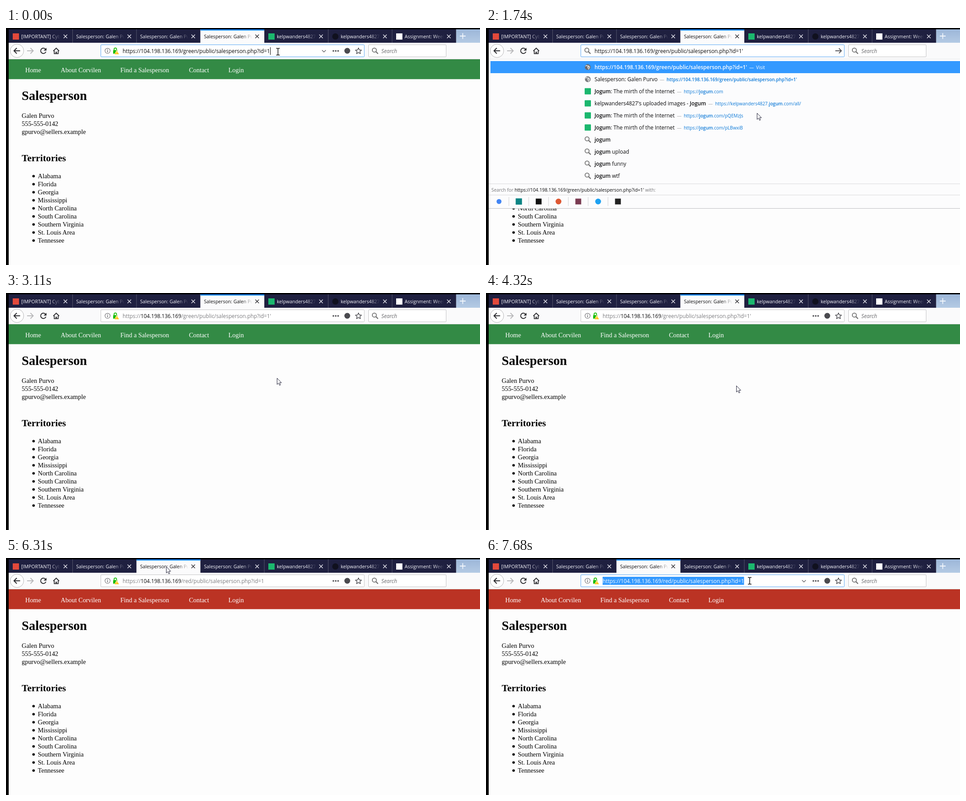
Write an HTML page that moves like this. It is 1057 px wide and 530 px high and loops after 7990 ms.

```html
<!DOCTYPE html>
<html lang="en">
<head>
<meta charset="utf-8">
<title>Browser session</title>
<style>
  html, body { margin: 0; width: 100%; height: 100%; overflow: hidden; background: #000; }
  svg { display: block; width: 100%; height: 100%; }
  text { white-space: pre; }
  .ui { font-family: "Open Sans", "Noto Sans", sans-serif; }
  .page { font-family: "Liberation Serif", "Times New Roman", serif; font-size: 14.4px; }
</style>
</head>
<body>
<svg id="stage" viewBox="0 0 1057 530"></svg>
<script>
const LOOP = 7990, TAB_W = 142.5, TAB_X = 6;
const INK = '#0c0c0d', ICON = '#4a4a4f', BLUE = '#3399ff', LINK = '#0a78d7';
const PERSON = 'Galen Purvo', USER = 'kelpwanders4827', SITE = 'Jogum';
const HOST = '104.198.136.169', PATH = '/public/salesperson.php?id=1';
const STATES = ['Alabama', 'Florida', 'Georgia', 'Mississippi', 'North Carolina',
  'South Carolina', 'Southern Virginia', 'St. Louis Area', 'Tennessee'];
const TABS = [
  { title: '[IMPORTANT] Cybersec', icon: '#e2493b' },
  { title: `Salesperson: ${PERSON}` },
  { title: `Salesperson: ${PERSON}` },
  { title: `Salesperson: ${PERSON}` },
  { title: `${USER}'s upl`, icon: '#1bb76e' },
  { title: `${USER}/we`, icon: '#10111f', round: true },
  { title: 'Assignment: Week 8', icon: '#ffffff' }
];

const rect = (x, y, w, h, fill, more = '') =>
  `<rect x="${x}" y="${y}" width="${w}" height="${h}" fill="${fill}" ${more}/>`;
const circle = (x, y, r, fill, more = '') =>
  `<circle cx="${x}" cy="${y}" r="${r}" fill="${fill}" ${more}/>`;
const line = (d, stroke, width = 1, more = '') =>
  `<path d="${d}" fill="none" stroke="${stroke}" stroke-width="${width}" ${more}/>`;
const text = (x, y, size, fill, body, more = '') =>
  `<text x="${x}" y="${y}" font-size="${size}" fill="${fill}" ${more}>${body}</text>`;
const bold = s => `<tspan font-weight="600">${s}</tspan>`;
const tint = (s, fill) => `<tspan fill="${fill}">${s}</tspan>`;
const at = (x, y, body) => `<g transform="translate(${x} ${y})">${body}</g>`;
const during = (t, a, b) => t >= a && t < b;

const magnifier = (x, y, color = '#737373') =>
  at(x, y, line('M1.6 1.6L6.6 6.6', color, 2.2) + circle(-1.6, -1.6, 4.5, 'none', `stroke="${color}" stroke-width="1.8"`));

const DEFS = `<defs>
  <linearGradient id="fade" gradientUnits="userSpaceOnUse" x1="92" x2="116">
    <stop stop-color="#fff"/><stop offset="1" stop-color="#000"/></linearGradient>
  <mask id="title" maskUnits="userSpaceOnUse" x="0" y="0" width="117" height="30">${rect(0, 0, 117, 30, 'url(#fade)')}</mask>
  <linearGradient id="glass" x2="0" y2="1"><stop stop-color="#9cb6d8"/><stop offset="1" stop-color="#b4cae4"/></linearGradient>
</defs>`;

// Pointer strokes: each runs from the end of the one before, along a quadratic curve.
const MOVES = [
  { start: 120, end: 660, steps: 5, via: [606, 115], to: [604.5, 190.5] },
  { start: 3420, end: 4320, steps: 7, via: [572, 204], to: [558.5, 207.5] },
  { start: 4470, end: 5220, steps: 6, via: [445, 115], to: [357.5, 19.5] },
  { start: 6620, end: 7220, steps: 5, via: [470, 145], to: [588, 51] }
];

function pointer(t) {
  let pos = [606.5, 53];
  for (const m of MOVES) {
    if (t < m.start) break;
    const k = Math.floor((t - m.start) / (m.end - m.start) * (m.steps - 1) + 1e-6);
    const p = Math.min(1, (k + 1) / m.steps), s = p * p * (3 - 2 * p);
    pos = pos.map((a, i) => a * (1 - s) ** 2 + 2 * m.via[i] * s * (1 - s) + m.to[i] * s * s);
  }
  return pos;
}

function drawTabs(v) {
  let out = rect(6, 3, 998, 30, '#1f2040') + rect(1004, 3, 53, 30, 'url(#glass)')
    + line('M1012 18H1025M1018.5 11.5V24.5', '#f4f8fd', 1.8);
  TABS.forEach((tab, i) => {
    const on = i === v.tab, hover = i === v.hoverTab && !on, busy = on && v.loading;
    let body = '';
    if (on) body += rect(0, 0, TAB_W, 30, '#fbfbfc') + rect(0, 0, TAB_W, 2.6, '#0a84ff');
    if (hover) body += rect(0, 0, TAB_W, 30, '#393a55') + rect(0, 0, TAB_W, 2, '#70707f');
    if (tab.icon) body += tab.round ? circle(16, 16, 7, tab.icon) : rect(9, 9, 14, 14, tab.icon);
    if (busy) body += circle(v.dot, 16, 1.8, '#55555c');
    body += `<g mask="url(#title)">${text(tab.icon || busy ? 28 : 8, 20, 10.6, on ? INK : '#f5f5fa', tab.title)}</g>`;
    body += line('M122.5 11.8L130.5 19.8M130.5 11.8L122.5 19.8', on ? '#2b2b30' : '#e6e6ee', 1.4);
    if (!on) body += line('M142.5 0V30', '#55566c', 1);
    out += at(TAB_X + i * TAB_W, 3, body);
  });
  return out;
}

function drawButtons(v) {
  return circle(24.5, 51, 15, '#fff', 'stroke="#b4b4b6"')
    + line('M31.5 51H18M24 44.8L17.8 51L24 57.2', '#2a2a2e', 2)
    + line('M47 51H60.5M54.5 44.8L60.7 51L54.5 57.2', '#b9b9bb', 2)
    + `<g opacity="${v.reloadDim ? 0.4 : 1}">`
    + line('M88 47.2A6 6 0 1 0 89 53', '#2a2a2e', 1.9)
    + '<path d="M90.3 44.3V50.6H84Z" fill="#2a2a2e"/></g>'
    + line('M105.5 51.5L112 45L118.5 51.5M107.6 51V57.4H116.4V51', '#2a2a2e', 1.8)
    + '<path d="M110.6 53h2.8v5h-2.8z" fill="#2a2a2e"/>';
}

function drawUrlBar(v) {
  const x = v.searching ? 242 : 260;
  let out = rect(211.5, 37.5, 587.5, 27, '#fff', `rx="1.5" stroke="${v.focus ? '#59a7f5' : '#c4c4c6'}"`);
  if (v.searching) out += magnifier(226.5, 51);
  else out += circle(226.5, 51, 5.7, 'none', 'stroke="#68686c" stroke-width="1.1"')
    + rect(225.8, 50, 1.5, 4.2, '#68686c') + rect(225.8, 47.5, 1.5, 1.5, '#68686c')
    + line('M241 50V47.5A2.8 2.8 0 0 1 246.6 47.5V50', '#12bc00', 1.7)
    + rect(239, 49.5, 9.6, 8, '#12bc00', 'rx="1"')
    + '<path d="M247 49.5L252.4 59H241.6Z" fill="#ffbf00" stroke="#fff" stroke-width=".8"/>'
    + rect(246.4, 52.5, 1.2, 3, '#fff') + rect(246.4, 56.4, 1.2, 1.1, '#fff');

  const dim = v.focus ? INK : '#7d7d80', fill = v.selected ? '#fff' : dim;
  const host = v.selected || v.focus ? HOST : tint(HOST, INK);
  out += rect(x, 42, 0, 18, BLUE, 'id="selection"')
    + text(x, 56, 11.82, fill, `https://${host}/${v.site}${PATH}${v.quote}`, 'id="url"')
    + rect(x, 43, 1, 17, v.caret ? '#000' : 'none', 'id="caret"');

  if (v.dropdown) out += line('M779 51H792M787 45.5L792.6 51L787 56.5', '#55555a', 1.8);
  else if (!v.searching) {
    if (v.hoverUrl) out += line('M704.8 49.5L709 53.7L713.2 49.5', '#68686c', 1.5);
    for (const dx of [-5.3, 0, 5.3]) out += circle(735.3 + dx, 51.3, 1.8, ICON);
    out += circle(761, 51, 6.5, ICON)
      + line('M786 44.5L788 49L792.8 49.4L789.2 52.6L790.3 57.4L786 54.8L781.7 57.4L782.8 52.6L779.2 49.4L784 49Z', ICON, 1.4, 'stroke-linejoin="round"');
  }
  return out + rect(808.5, 37.5, 173, 27, '#fff', 'rx="1.5" stroke="#c4c4c6"')
    + magnifier(823, 51) + text(837, 56, 11.82, '#6b6b6e', 'Search', 'font-style="italic"');
}

function drawPage(v) {
  let out = rect(6, 70, 1051, 460, '#fdfdfd')
    + rect(6, 70, 1051, 44.4, v.site === 'red' ? '#bb3324' : '#338a45');
  const nav = [[43, 'Home'], [122, 'About Corvilen'], [255, 'Find a Salesperson'], [408, 'Contact'], [496, 'Login']];
  for (const [x, label] of nav) out += text(x, 99, 14.4, '#fff', label);
  out += text(35, 161, 28.8, '#000', 'Salesperson', 'font-weight="700"')
    + text(35, 298, 21.6, '#000', 'Territories', 'font-weight="700"');
  [PERSON, '555-555-0142', 'gpurvo@sellers.example'].forEach((s, i) => out += text(35, 201 + 18 * i, 14.4, '#000', s));
  STATES.forEach((s, i) => {
    const y = 336 + 18 * i;
    out += circle(61.5, y - 4.7, 2.8, '#000') + text(71, y, 14.4, '#000', s);
  });
  return out;
}

const globe = (y, color) => circle(227, y, 6.5, color)
  + line(`M222 ${y - 2}q3 -3 5 0t-1 4M229 ${y - 4}q-1 3 3 4M228 ${y + 5}l3 -4`, '#fff', 1.4);

function drawDropdown() {
  const url = `https://${HOST}/green${PATH}'`, low = SITE.toLowerCase();
  const result = (title, link) => `${title}<tspan dx="5" font-size="10.3" fill="#a6a6a9">—</tspan>`
    + `<tspan dx="5" font-size="10.1" fill="${LINK}">${link}</tspan>`;
  const motto = `${bold(SITE)}: The mirth of the Internet`;
  const link = path => `https://${bold(low)}.com${path}`;
  const rows = [
    `${bold(url)}<tspan dx="5" font-size="10.3">—</tspan><tspan dx="5" font-size="10.3">Visit</tspan>`,
    result(`Salesperson: ${PERSON}`, bold(url)),
    result(motto, link('')),
    result(`${USER}'s uploaded images - ${bold(SITE)}`, `https://${USER}.${bold(low)}.com/all/`),
    result(motto, link('/pQEMzJs')),
    result(motto, link('/pLBwxiB')),
    ...['', ' upload', ' funny', ' wtf'].map(s => bold(low) + s)
  ];
  let out = rect(6, 69.5, 1051, 334, '#fcfcfd') + rect(10, 74, 1047, 27, BLUE);
  rows.forEach((row, i) => {
    const y = 87.5 + 27 * i;
    out += i < 2 ? globe(y, i ? '#7b7b7e' : '#68686c')
      : i < 6 ? rect(220, y - 7, 14, 14, '#1bb76e', 'rx="1"') : magnifier(227, y);
    out += text(242, y + 4.3, 11.82, i ? INK : '#fff', row);
  });
  out += line('M6 348.5H1057M6 373.5H1057', '#d9d9db') + line('M6 403.5H1057', '#bdbdc0')
    + text(12, 365.5, 10.3, '#77777a', `Search for ${tint(url, INK)} with:`);
  ['#4285f4', '#0c8484', '#111111', '#de5833', '#7a3b52', '#1da1f2', '#222222'].forEach((color, i) => {
    const x = 29 + 44.2 * i;
    out += i % 2 ? (i === 1 ? rect(x - 7, 381, 14, 14, color) : circle(x, 388, 6.5, color))
      : i ? rect(x - 6.5, 381.5, 13, 13, color) : circle(x, 388, 5.5, color);
    if (i < 6) out += line(`M${x + 22} 378V398`, '#d0d0d2');
  });
  return out;
}

function drawPointer([x, y], beam) {
  return at(x, y, beam
    ? line('M-4 -7.5H-1L0 -6.5L1 -7.5H4M0 -6.5V6.5M-4 7.5H-1L0 6.5L1 7.5H4', '#111', 1.5)
    : '<path d="M0 0V14L3.2 11L5.5 16L7.7 15L5.5 10.2H9.8Z" fill="#fff" stroke="#222238" stroke-width="1"/>');
}

function view(t) {
  const pos = pointer(t), [x, y] = pos;
  const loading = during(t, 2050, 2500), dropdown = during(t, 1590, 2050), red = t >= 6310;
  const beat = Math.floor((t - 2200) / 150) * 150;
  return {
    pos, loading, dropdown,
    tab: red ? 2 : 3,
    site: red ? 'red' : 'green',
    quote: during(t, 1590, 6310) ? "'" : '',
    searching: dropdown || loading,
    focus: t < 2050 || t >= 7530,
    selected: t >= 7680,
    caret: t < 120 || during(t, 660, 1280) || during(t, 1590, 1740) || during(t, 7530, 7680),
    reloadDim: during(t, 2500, 3110),
    dot: 9.5 + 5.5 * (1 - Math.cos(beat / 900 * 2 * Math.PI)),
    hoverTab: y < 33 ? Math.floor((x - TAB_X) / TAB_W) : -1,
    hoverUrl: during(x, 211, 799) && during(y, 37, 65)
  };
}

const stage = document.getElementById('stage');
let shown = '';

function render(t) {
  const v = view(t), key = JSON.stringify(v);
  if (key === shown) return;
  shown = key;
  stage.innerHTML = DEFS + rect(0, 0, 1057, 530, '#000')
    + `<g class="page">${drawPage(v)}</g><g class="ui">${drawTabs(v)}`
    + rect(6, 33, 1051, 36.5, '#fafafb') + line('M6 69.5H1057', '#d5d5d7')
    + drawButtons(v) + drawUrlBar(v) + (v.dropdown ? drawDropdown() : '') + '</g>'
    + drawPointer(v.pos, v.hoverUrl);
  const url = stage.querySelector('#url'), width = url.getComputedTextLength();
  stage.querySelector('#caret').setAttribute('x', Math.round(+url.getAttribute('x') + width));
  if (v.selected) stage.querySelector('#selection').setAttribute('width', width);
}

const begin = performance.now();
function tick() {
  render((performance.now() - begin) % LOOP);
  requestAnimationFrame(tick);
}
tick();
</script>
</body>
</html>
```
